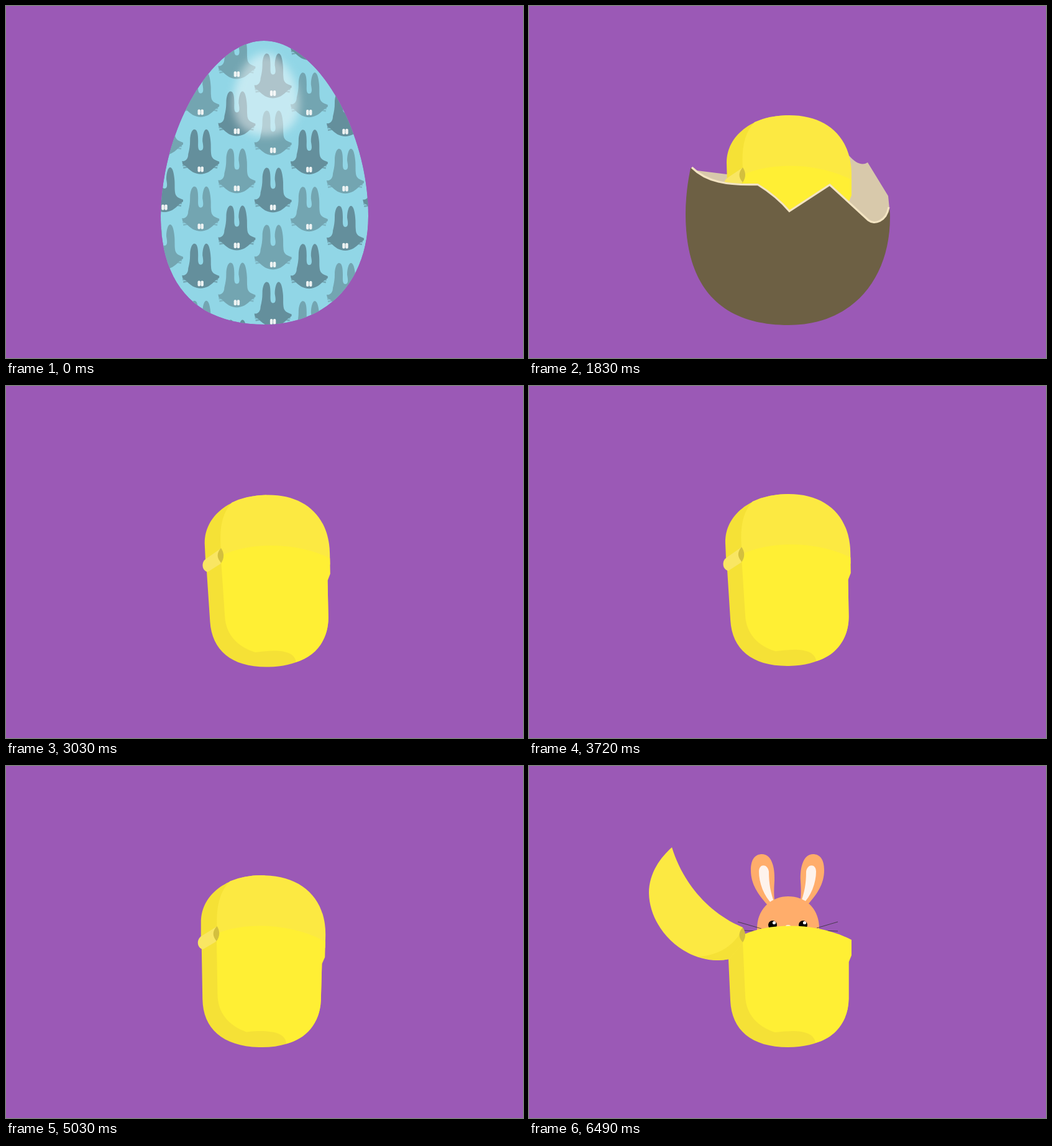
Animation, 832 px wide and 567 px high, one loop 7350 ms. Source, as an HTML page:

```html
<!DOCTYPE html>
<html lang="en">
<head>
<meta charset="utf-8">
<title>Surprise egg</title>
<style>
html, body { margin: 0; width: 100%; height: 100%; overflow: hidden; background: #9b59b6; }
svg { display: block; width: 100%; height: 100%; }
.choc { fill: #6d6044; }
.lid { fill: #fce942; }
.shade { fill: #f5e136; }
.fur { fill: #ffad6b; }
.cream { fill: #fef3ec; }
.dark { color: #648f9c; }
.light { color: #73a5b1; }
</style>
</head>
<body>
<svg viewBox="0 0 832 567">
  <defs>
    <filter id="soft" x="-30%" y="-30%" width="160%" height="160%"><feGaussianBlur stdDeviation="7"/></filter>
    <path id="eggShape" d="M415 56C500 56 583 200 583 338C583 440 520 513 416 513C304 513 249 447 249 338C250 200 331 56 415 56Z"/>
    <path id="chocShape" d="M414 63C497 63 581 205 581 340C581 440 520 514 418 514C303 514 252 447 252 335C252 205 332 63 414 63Z"/>
    <clipPath id="eggClip"><use href="#eggShape"/></clipPath>
    <clipPath id="chocClip"><use href="#chocShape"/></clipPath>
    <clipPath id="tear">
      <path d="M240 212L273 208C286 203 300 201 309 205L329 221L368 279L407 253L468 354Q500 322 508 297V290Q511 282 520 289L537 304C547 274 559 249 573 252L600 250V530H240Z"/>
    </clipPath>
    <path id="glow" d="M417 76C444 76 472 118 472 158C472 190 450 209 418 209C386 209 365 190 365 158C365 118 390 76 417 76Z" fill="#fff" filter="url(#soft)"/>

    <g id="face">
      <path fill="currentColor" d="M0 0C-9 0-17-5-23-12L-29-16-30-21C-24-20-20-25-20-32C-18-40-17-46-17-54C-17-64-14-72-10-72C-5-72-4-63-4-53C-4-47-5-38 0-38C6-38 4-47 3-53C3-64 6-72 9-72C13-72 15-64 16-54C17-46 16-40 17-32C18-24 23-23 30-20L30-17 23-12C17-5 9 0 0 0Z"/>
      <path fill="none" stroke="currentColor" stroke-width="2.5" opacity=".65" d="M-29-14L-20-15M-28-10L-18-12M28-14L20-15M27-10L17-12"/>
      <rect x="-4.7" y="-12.3" width="4.4" height="9" rx="2" fill="#eef3f3"/>
      <rect x=".3" y="-12.3" width="4.4" height="9" rx="2" fill="#eef3f3"/>
    </g>

    <g id="base">
      <path class="shade" d="M346 270L320 290L324 378C326 425 358 453 417 453C480 453 514 420 514.5 375V300Z"/>
      <path fill="#ffef34" d="M344 272C390 251 465 252 519 280V305L514.5 316V375C514 412 492 438 461 446C459 428 435 424 396 429C368 420 349 400 348 370L344 283Z"/>
    </g>
    <path id="hinge" fill="#d3bf3e" d="M344 260Q333 272 344 284Q352 272 344 260Z"/>
    <g id="capsule">
      <path class="shade" d="M318 252C318 210 358 176 419 176L400 290H319Z"/>
      <path class="lid" d="M363 187Q387 176 419 176C480 176 519 212 519 272V290H344V262C342 230 346 205 363 187Z"/>
      <use href="#base"/>
      <path fill="#f9e663" d="M319 277L343 261V285L322 298C313 296 311 283 319 277Z"/>
      <use href="#hinge"/>
    </g>

    <g id="ear">
      <path class="fur" d="M384 224C368 206 357 190 357 168C357 150 364 142 375 142C390 142 396 162 395 185C394 200 394 210 396 224Z"/>
      <path class="cream" d="M392 223C378 210 370 188 370 170C370 157 384 157 386 170C386 190 389 205 395 221Q395 225 392 223Z"/>
    </g>
    <g id="eye"><circle cx="392" cy="256" r="7"/><circle cx="394.5" cy="252.5" r="2.6" fill="#fff"/></g>
  </defs>

  <rect width="832" height="567" fill="#9b59b6"/>

  <g data-on="930 1830">
    <use href="#chocShape" class="choc"/>
    <use href="#glow" opacity=".2"/>
  </g>
  <g data-on="0 1290" id="wrap">
    <g id="foil" clip-path="url(#eggClip)"><use href="#eggShape" fill="#91d6e6"/></g>
  </g>
  <use data-on="0 930" href="#glow" opacity=".48"/>

  <path data-on="1830 2370" fill="#d8c9ab" d="M262 264L318 271L500 270L515 241C524 251 532 256 541 254L545 252L578 306L580 326L560 380H300Z"/>
  <use data-on="1830 6490" href="#capsule" id="shaker"/>
  <g data-on="1830 2370">
    <path class="choc" clip-path="url(#chocClip)" d="M262 261C285 283 318 289 368 287.5Q398 306 419 330.5L484 288L546 345C556 353 576 347 580 324L600 530H230V261Z"/>
    <path fill="none" stroke="#f3e4c2" stroke-width="3.2" d="M262 260C285 283 318 289 368 287.5Q398 306 419 330.5L484 288L546 345C556 353 575 347 579 324"/>
  </g>

  <g data-on="6490 7350">
    <use href="#ear"/>
    <use href="#ear" transform="matrix(-1 0 0 1 832 0)"/>
    <path class="fur" d="M367 270V262C367 230 390 210 417 210C446 210 467 230 467 262V270Z"/>
    <use href="#eye"/>
    <use href="#eye" x="49"/>
    <ellipse class="cream" cx="417" cy="258" rx="4" ry="2"/>
    <path fill="none" stroke="#333" stroke-width=".8" d="M336 251L374 262M346 265L369 266M497 251L463 261M497 266L470 265"/>
    <use href="#base"/>
    <path class="lid" d="M230 131C212 147 193 172 193 205C194 260 245 313 304 313Q314 313 322 311L344 285V260C290 237 248 190 230 131Z"/>
    <path class="shade" d="M344 262C330 290 305 305 273 307Q297 316 322 311L344 285Z"/>
    <use href="#hinge"/>
  </g>
</svg>
<script>
const LOOP = 7350;
const $ = id => document.getElementById(id);

// Diagonal print: each column sits 61.2 higher, dark and light faces alternate.
function addFace(x, y, tone) {
  const use = document.createElementNS('http://www.w3.org/2000/svg', 'use');
  use.setAttribute('href', '#face');
  use.setAttribute('class', tone);
  use.setAttribute('transform', `translate(${x} ${y})`);
  $('foil').append(use);
}
for (let col = 0; col < 7; col++) {
  for (let row = -2; row < 9; row++) {
    addFace(255 + col * 58.2, 332 - col * 61.2 + row * 92, row % 2 ? 'light' : 'dark');
  }
}

// Shake: start times of the held poses, and a cycle of [x, y, degrees].
const range = (from, to, n) => Array.from({ length: n }, (_, i) => from + (to - from) * i / (n - 1));
const starts = [
  2520, ...range(2670, 3150, 5), ...range(3220, 3360, 3), ...range(3480, 4170, 7), 4290,
  ...range(4440, 5030, 6), ...range(5180, 5660, 5), 5780, 5870, ...range(5990, 6390, 5)
];
const poses = [
  [-2, .5, .3], [-1, -2, -1], [-3, 0, .8], [0, 2, 0], [3, -.4, -1.2],
  [-1, 2, -1], [-3, 1, 0], [1.25, 0, .62], [-1, -1, 1], [2, 2, 0]
];

function strength(t) {
  if (t < 2520 || (t >= 4440 && t < 4570)) return 0;
  return t >= 4570 && t < 5990 ? 2 : 1;
}

function shake(t) {
  const step = starts.filter(s => s <= t).length - 1;
  const [x, y, turn] = poses[Math.max(step, 0) % poses.length].map(v => v * strength(t));
  $('shaker').setAttribute('transform', `translate(${x} ${y}) rotate(${turn} 416 314)`);
}

const scenes = [...document.querySelectorAll('[data-on]')].map(el => {
  const [from, to] = el.dataset.on.split(' ').map(Number);
  return { el, from, to };
});

const begin = performance.now();
function draw() {
  const t = (performance.now() - begin) % LOOP;
  for (const { el, from, to } of scenes) el.style.display = t >= from && t < to ? '' : 'none';
  $('wrap').setAttribute('clip-path', t < 930 ? 'none' : 'url(#tear)');
  shake(t);
  requestAnimationFrame(draw);
}
draw();
</script>
</body>
</html>
```
